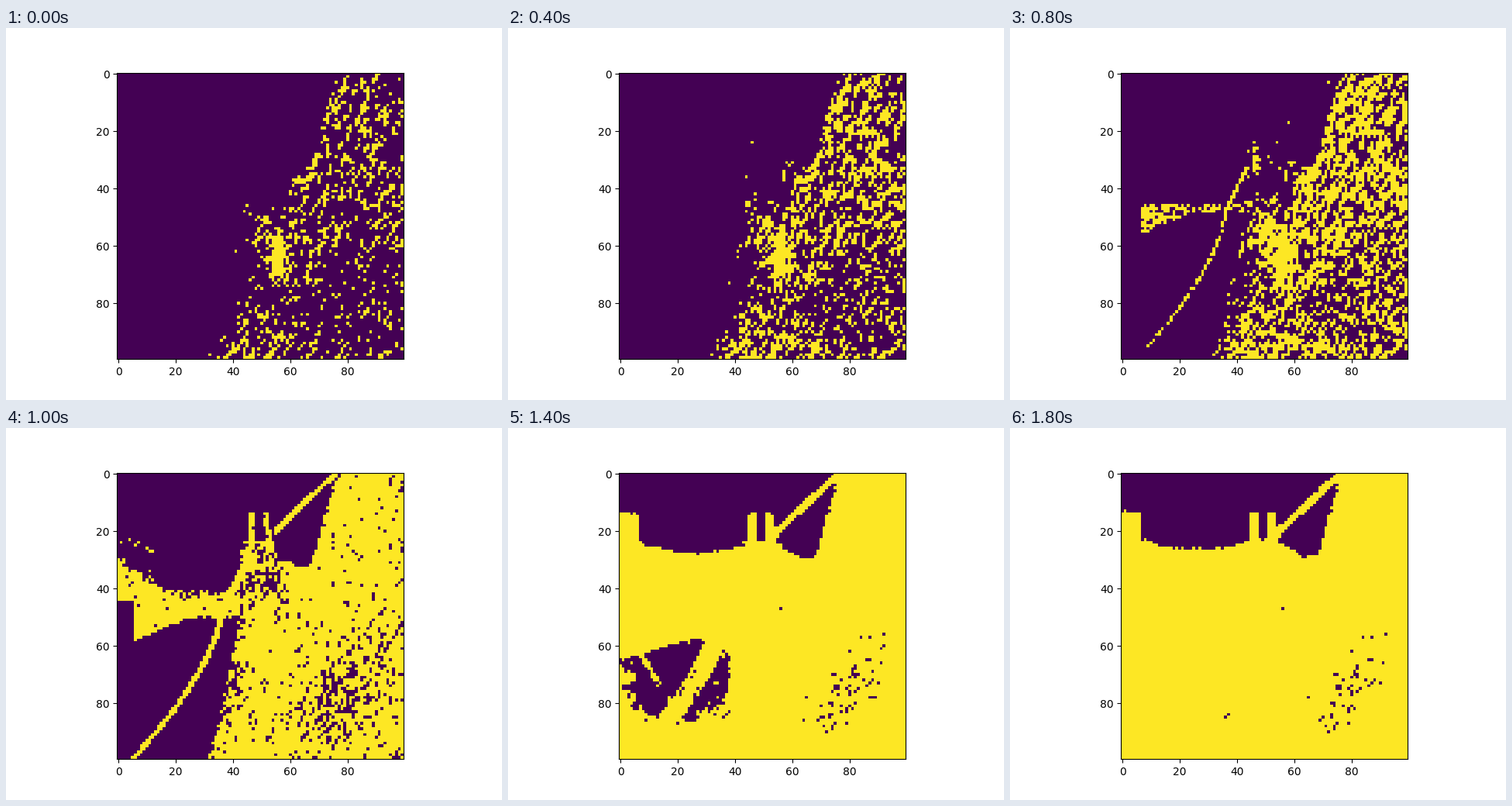
Recreate the animation shown at these times as a matplotlib script. Size 640 px wide and 480 px high, loop 2000 ms.

```python
import numpy as np
import matplotlib.pyplot as plt
from matplotlib.animation import FuncAnimation

N, FRAMES, STEP = 100, 20, 100
NEVER = 99

# The slope lights up as a cutoff rises through its shade, unevenly in time.
TIMES = (1, 4, 8, 10, 11, 14, 18)
CUTOFFS = (-0.84, -0.33, 0.13, 1.64, 2.9, 3.6, 3.8)

rng = np.random.default_rng(12)
y, x = np.mgrid[:N, :N].astype(float)
jitter = rng.normal(0, 0.3, (N, N))
chance = rng.random((N, N))


def noise(*steps):
    """Normal noise, smeared along each (dy, dx, weight) step."""
    g = rng.normal(size=(N, N))
    for dy, dx, weight in steps:
        g = g + weight * np.roll(g, (dy, dx), (0, 1))
    return g / g.std()


def spot(cx, cy, rx, ry):
    """Soft round spot with a peak of one."""
    return np.exp(-((x - cx) / rx) ** 2 - ((y - cy) / ry) ** 2)


def disc(cx, cy, rx, ry):
    return ((x - cx) / rx) ** 2 + ((y - cy) / ry) ** 2 + jitter / 3 < 1


def recede(mask, low, mid, top):
    """Dark area whose lower edge climbs from low over mid to top."""
    h = y + jitter
    first = np.clip((low - h) / (low - mid), 0, 1)
    second = np.clip((mid - h) / (mid - top), 0, 1)
    when = np.where(h < top, NEVER, np.ceil(11 + 3 * first + 4 * second))
    inside = mask & (h < low)
    arrival[inside] = when[inside]


def paint(mask, time, share=1):
    arrival[mask & (chance < share)] = time


# guiding curves
edge = 76.8 - 0.31 * y
west = 43 - 0.23 * np.maximum(y - 50, 0)
left_cable = np.where(y < 48, 36 + 0.5 * (48 - y),
                      36 - 0.069 * np.maximum(y - 48, 0) ** 1.55)
right_cable = 0.5 + 19.5 * np.clip((76 - x) / 21, 0, 1) ** 1.1
from_left = abs(x - left_cable)
from_right = abs(y - right_cable)

arrival = np.full((N, N), 11.0)

# speckles on the hills
paint(chance < 0.6 * spot(20, 37, 9, 5), 13)

# water, drying up towards its middle
coast = np.maximum(57, 65 - 0.3 * x)
water = (y + jitter > coast) & (y + jitter < 91 - 0.06 * x)
water &= (x + jitter < 41.5 - 0.23 * (y - 57)) & (from_left > 1.8)
radius = ((x - 19) / 19) ** 2 + ((y - 71) / 15) ** 2
dry = 18 - 4 * radius + 0.9 * noise((1, 0, 1), (0, 1, 1), (2, -1, 0.8))
dry[(from_left < 4) | (abs(x - 9 - 0.6 * (y - 66)) < 1.2)] -= 3.5
arrival[water] = np.ceil(np.clip(dry, 11.5, 18))[water]
paint(disc(1, 71, 5, 2.2), 11)
paint((abs(y - 81 - 0.4 * x) < 1) & (x < 13), 11)
paint(disc(0, 53, 4.2, 9), 13)

# sky
bowl = ((x - 27) / 23) ** 2
ridge = np.where(x < 7, 13, 26.5 - 4.5 * bowl)
recede(x < 45, 29.5 - 7 * bowl, ridge + 1, ridge)
notch = np.where((x >= 48) & (x <= 50), 23, 13.5)
recede((x >= 45) & (x < 54), notch + 1, notch + 0.6, notch)
over = right_cable - 1.5
recede((x >= 54) & (x < 75), over + 0.5, over + 0.3, over)
paint(disc(0, 16, 3.5, 2.5), 11)
paint((abs(y - 23 - 0.03 * x ** 2) < 1) & (x < 14), 10, 0.5)

# hills
crest = 42.5 - 13 * ((x - 30) / 30) ** 2
foot = np.where(x < 6, 44.5, np.maximum(50, 58 - 0.45 * (x - 7)))
hill = (y + 4 * jitter > crest) & (y + jitter < foot) & (x < 43)
paint(hill, 10, 0.97)
paint(hill & (x > 6) & (x < 23) & (y > 45) & (y < foot - 2), 8, 0.58)
paint((x > 22) & (x < 43) & (abs(y - 47) <= 1), 8, 0.35)

# slope: grain with brighter and darker places
shade = noise((1, 0, 0.45), (1, -1, 0.3))
shade += 1.25 * np.exp(-((x - west) / 8) ** 2) * (x < 60)
shade -= 0.5 * np.exp(-((x - edge) / 4) ** 2) * (y < 58)
for place, darker in (
        ((56, 64, 4, 7), -2.6),     # bright rock
        ((50, 52, 5, 7), -1.0),     # boulders
        ((42, 98, 10, 7), -1.1),    # beach
        ((57, 45, 4, 8), 1.2),      # gully
        ((54, 34, 5, 9), 1.8),      # pylon foot
        ((86, 14, 4, 7), -0.4),
        ((96, 88, 5, 8), -0.5),
        ((86, 84, 20, 20), 0.5)):
    shade += darker * spot(*place)
hollow = np.exp(-((x + 0.85 * y - 144) / 14) ** 2 - ((x - 80) / 17) ** 2)
shade *= np.where(shade > 0, 1 + 1.6 * hollow, 1)
land = ((x + jitter > west) & (y > 23)) | (x + jitter > edge)
lit = np.ceil(np.interp(shade, CUTOFFS, TIMES, left=0, right=NEVER))
arrival[land] = lit[land]

# gorge between the right cable and the slope
floor = np.minimum(29, 24 + 0.6 * (x - 55))
gorge = (x >= 55) & (x + jitter < edge) & (y > right_cable + 2)
paint(gorge & (y < floor + 4), 11)
recede(gorge, floor + 2, floor + 0.8, floor)

# pylon
for cx, lean in ((46.5, -0.04), (51.5, 0.1)):
    leg = (abs(x - cx - lean * (y - 14)) < 1) & (y >= 14) & (y < 35)
    paint(leg, 10, 0.9)
paint((abs(x - 46.5) < 1) & (y > 25) & (y < 36), 7, 0.7)
paint((x == 57) & (abs(y - 35.5) < 2), 3)

# cables
span = y > 32
paint(span & (from_left < 1.1), 10)
paint(span & (from_left < 0.6) & (y < 96), 8, 0.85)
wire = (x >= 55) & (x < 77)
paint(wire & (from_right < 1.2), 10)
paint(wire & (from_right < 0.7), 8, 0.2)

fig, ax = plt.subplots(figsize=(6.4, 4.8), dpi=100)
image = ax.imshow(arrival <= 0, vmin=0, vmax=1, cmap="viridis",
                  interpolation="nearest")


def update(i):
    image.set_data(arrival <= i)
    return [image]


anim = FuncAnimation(fig, update, frames=FRAMES, interval=STEP, repeat=True,
                     repeat_delay=0)
plt.show()
```
